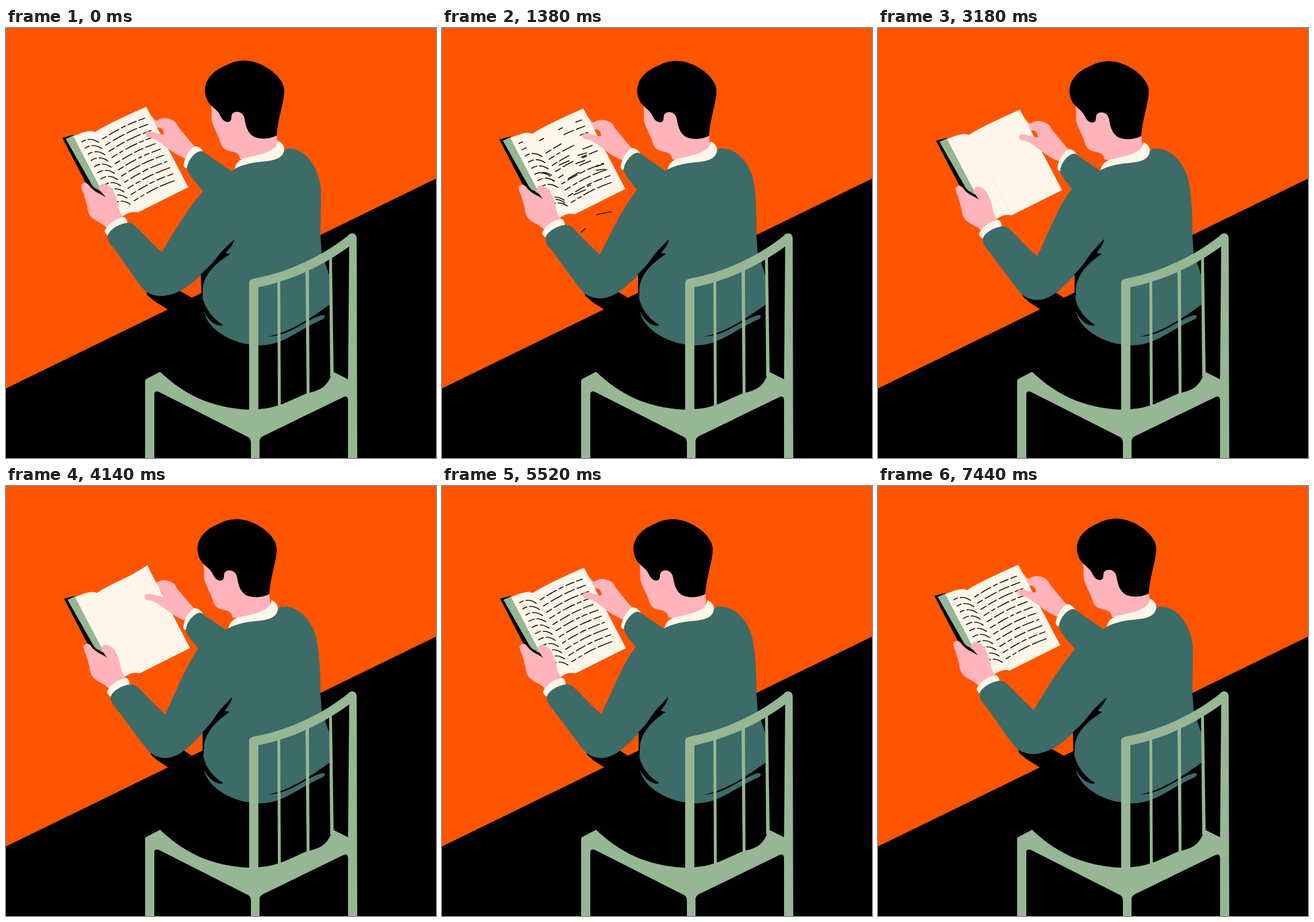
These frames come from a looping animation (748x748 px, 7500 ms). An HTML page:

```html
<!DOCTYPE html>
<html lang="en">
<head>
<meta charset="utf-8">
<title>Reader</title>
<style>
  html, body { margin: 0; width: 100%; height: 100%; overflow: hidden; background: #ff5500; }
  svg { display: block; width: 100vw; height: 100vh; }
  .ink path { fill: none; stroke: #14180f; stroke-width: 1.7; stroke-linecap: round; }
  .teal { fill: #3c6b68; }
  .skin { fill: #ffb3ba; }
  .cream { fill: #fff6ea; }
  .green { fill: #96b694; }
</style>
</head>
<body>
<svg viewBox="0 0 748 748">
  <defs>
    <clipPath id="flapClip"><path id="flapClipPath"/></clipPath>
    <path id="finger" class="skin" d="M248 150C254 150 258 163 263 161C270 155 286 154 297 166L292 190L275 185C274 176 270 171 262 174C256 166 250 155 248 150Z"/>
  </defs>
  <path fill="#ff5500" d="M0 0H748V748H0Z"/>
  <path d="M0 627L748 262V748H0Z"/>
  <path id="thigh"/>

  <g id="fingerBack"><use href="#finger"/></g>
  <g id="book">
    <path d="M98 191L117 186L175 290L172 296L138 268Z"/>
    <path class="green" d="M104 193L117 187L168 284L160 284L150 274Z"/>
    <path class="cream" d="M117 188C130 183 145 177 152 180L155 181C180 165 215 150 244 137L317 277L229 321C220 318 210 322 204 327L191 330Z"/>
    <path d="M189 245L229 321" stroke="#eaded0" stroke-width=".8"/>
    <path d="M144 274L160 281L174 294L165 293Z"/>
    <g id="leftInk" class="ink"></g>
    <g id="rightInk" class="ink"></g>
  </g>
  <g id="fingerFront"><use href="#finger"/></g>
  <g id="flapLayer">
    <path id="flap" class="cream"/>
    <g id="flapInk" class="ink" clip-path="url(#flapClip)"></g>
  </g>
  <g id="fallInk" class="ink"></g>

  <g id="nearHand">
    <path class="skin" d="M133 271C137 268 142 270 145 275C152 285 165 288 174 295C170 288 159 282 163 275C166 268 176 271 181 276C189 284 194 300 196 312C198 322 203 327 207 333L176 349C170 340 160 338 152 332C142 325 142 315 141 308C138 302 139 297 136 293C137 288 132 285 132 279C130 275 131 272 133 271Z"/>
    <path class="cream" d="M172 352C180 337 195 330 206 329C211 333 212 338 210 342L184 364L176 360C172 356 171 354 172 352Z"/>
  </g>
  <g id="farHand">
    <path class="skin" d="M276 164C285 157 296 163 299 171C308 182 318 195 330 208L312 227C300 222 288 215 280 208C270 202 262 192 250 191C241 190 240 181 247 180C256 179 266 186 275 185C275 176 272 171 270 168Z"/>
    <path class="cream" d="M309 239C310 226 318 212 328 206C334 205 340 210 343 215L319 243C314 245 309 243 309 239Z"/>
  </g>

  <path id="torso" class="teal"/>
  <path id="sleeve" class="teal" d="M341 214L392 249L425 280L370 320L343 284C330 268 314 252 315 243C316 230 330 213 341 214Z"/>
  <path id="fold"/>
  <g id="head">
    <path class="skin" d="M354 130C361 140 355 152 359 165C363 177 370 188 373 199C377 212 385 213 394 215C402 217 406 220 407 228L440 230L474 212L471 185L420 135Z"/>
    <path d="M346 108C347 85 365 72 385 64C395 58 410 56 420 57C450 60 483 85 484 108C484 130 473 155 471 187C460 193 445 194 433 190C420 184 417 170 415 158C413 147 402 143 395 148C390 152 394 158 390 162C385 166 377 162 373 153C370 145 362 140 356 134C350 128 346 118 346 108Z"/>
  </g>
  <path id="collar" class="cream" d="M398 245C400 235 405 230 415 226C435 222 455 218 466 209C472 204 472 200 473 196C482 200 486 208 483 216C478 230 460 231 440 233C425 235 410 238 398 245Z"/>

  <g class="green">
    <path fill-rule="evenodd" d="M423 443C423 438 429 436 435 435C490 425 550 397 594 362C600 354 610 357 610 366L611 748H595V648C595 641 591 640 587 642L447 710C442 713 441 716 441 720V748H426V722C426 716 424 713 420 711L266 633C261 631 258 633 258 637V748H242V614Q242 611 245 610L268 598C308 636 355 661 423 664ZM439 451C500 438 550 414 597 380L595 611L569 598L565 606C556 628 541 631 525 635C502 643 478 661 439 663Z"/>
    <path d="M472 438H477L478 660H473Z M521 420H527L528 640H523Z M562 400H567L570 606H564Z"/>
  </g>
</svg>
<script>
const LOOP = 7500, STEP = 60, ROWS = 11;
const $ = id => document.getElementById(id);
const clamp = x => Math.max(0, Math.min(1, x));
const ramp = (t, a, b) => clamp((t - a) / (b - a));
const ease = (t, a, b) => { const x = ramp(t, a, b); return x * x * (3 - 2 * x); };
const lerp = (a, b, k) => a + (b - a) * k;
const mix = (p, q, k) => [lerp(p[0], q[0], k), lerp(p[1], q[1], k)];
const pt = p => p.map(v => v.toFixed(2)).join(' ');
const move = (id, x, y, extra = '') => $(id).setAttribute('transform', `translate(${x} ${y})${extra}`);
const show = (id, on) => $(id).setAttribute('display', on ? 'inline' : 'none');

// Blends two path strings that share the same commands.
function blend(a, b, k) {
  const nums = b.match(/-?[\d.]+/g);
  let i = 0;
  return a.replace(/-?[\d.]+/g, n => lerp(+n, +nums[i++], k).toFixed(2));
}

const hem = 'C341 480 355 500 372 513C378 515 378 518 374 518C360 517 348 503 344 492C350 525 395 552 443 552C482 552 510 524 550 507C557 503 556 498 548 500C520 508 495 536 454 537C485 532 518 514 563 481L563 432L549 390L547 360';
const shapes = {
  torso: [
    'M392 249C375 255 352 270 343 284C317 312 288 362 271 390C255 376 235 354 222 342C213 334 190 343 180 355C174 363 177 372 185 380C205 405 222 435 240 455C248 464 262 467 275 466C300 463 320 448 339 430L372 405C350 422 341 440 341 458' + hem + 'C547 335 548 310 548 285C547 250 525 207 488 210L484 212L430 225Z',
    'M386 248C370 255 347 268 337 280C315 307 292 367 277 397C260 383 241 361 228 349C219 340 195 349 185 361C180 368 182 377 190 385C210 410 230 440 248 461C255 469 268 474 281 473C306 470 324 448 342 430L372 405C352 422 343 440 343 458' + hem + 'C547 330 546 298 541 270C536 240 512 206 478 210L474 213L420 226Z'],
  fold: [
    'M397 368C396 376 388 385 382 391L390 393L373 405C351 422 342 440 342 458L342 468L340 464L339 428C355 415 366 400 374 390C382 382 390 374 397 368Z',
    'M393 367C393 375 386 384 380 391L389 393L373 405C353 422 344 440 344 458L344 468L342 462L342 428C356 415 364 400 372 390C379 382 387 374 393 367Z'],
  thigh: [
    'M243 456L246 465L258 475L282 490L323 469L298 455Z',
    'M250 460L252 467L263 477L283 490L323 469L306 458Z']
};

let seed = 11;
const rand = () => (seed = (seed * 16807) % 2147483647) / 2147483647;

const rightPoint = (row, u) => [168 + 73 * u + 5.5 * row, 193 - 36 * u - 3 * Math.sin(Math.PI * u) + 10.75 * row];
const leftPoint = (row, u) => [132 + 29 * u + 5.5 * row, 198 - 18 * u + 19 * u * u + 10.75 * row];

function makeDash(place, row, from, to) {
  const a = place(row, from), m = place(row, (from + to) / 2), b = place(row, to);
  const ctrl = [0, 1].map(i => 2 * m[i] - (a[i] + b[i]) / 2);
  return {
    d: `M${pt(a)}Q${pt(ctrl)} ${pt(b)}`, mid: m, left: place === leftPoint,
    start: 860 + 45 * row + rand() * 1150, spin: (rand() - .5) * 400
  };
}

const dashes = [];
for (let row = 0; row < ROWS; row++) {
  const split = .22 + rand() * .1;
  dashes.push(makeDash(leftPoint, row, 0, split), makeDash(leftPoint, row, split + .16, 1));
  let u = 0;
  while (u < .95) {
    const len = u === 0 || rand() < .35 ? .07 + rand() * .06 : .18 + rand() * .16;
    const end = Math.min(1, u + len);
    dashes.push(makeDash(rightPoint, row, u, end));
    u = end + .065;
  }
}

function addDash(dash, groupId) {
  const path = document.createElementNS('http://www.w3.org/2000/svg', 'path');
  path.setAttribute('d', dash.d);
  $(groupId).append(path);
  return path;
}
for (const dash of dashes) {
  dash.falling = addDash(dash, 'fallInk');
  addDash(dash, dash.left ? 'leftInk' : 'rightInk');
  if (dash.left) addDash(dash, 'flapInk');
}

const spine = [[155, 181], [229, 321]];
const rightEdge = [[244, 137], [317, 277]];
const leftEdge = [[117, 188], [191, 328]];

function flapPath(q) {
  const turn = (i, x, lift) => {
    const flat = mix(rightEdge[i], leftEdge[i], (1 - Math.cos(Math.PI * x)) / 2);
    return { flat, tip: [flat[0], flat[1] - lift * Math.sin(Math.PI * x)] };
  };
  const top = turn(0, q, 27), low = turn(1, clamp(q - .07 * Math.sin(Math.PI * q)), 6);
  const curl = Math.sin(Math.PI * q);
  const side = mix(top.tip, low.tip, .12);
  const bend = [side[0] - 5 * curl, side[1] + 3 * curl];
  return `M${pt(spine[0])}Q${pt(mix(spine[0], top.flat, .75))} ${pt(top.tip)}` +
    `Q${pt(bend)} ${pt(mix(top.tip, low.tip, .25))}L${pt(low.tip)}L${pt(spine[1])}Z`;
}

// Ink slides along the slope of the page and is lost behind the arm.
function drop(dash, t) {
  const s = Math.max(0, t - dash.start) / 1000;
  const y = 700 * s * s;
  const [x0, y0] = dash.mid;
  dash.falling.setAttribute('transform', `translate(${.45 * y} ${y}) rotate(${dash.spin * s * s} ${x0} ${y0})`);
  dash.falling.setAttribute('display', y0 + y < 435 ? 'inline' : 'none');
}

function draw(t) {
  const body = ease(t, 600, 1960) - ease(t, 6000, 6940);
  const head = ease(t, 660, 2100) - ease(t, 6200, 6860);
  const reach = ease(t, 4000, 4700) - ease(t, 4800, 5560);
  const q = ramp(t, 4060, 5460);
  const turning = q > 0 && q < 1;

  for (const id in shapes) $(id).setAttribute('d', blend(...shapes[id], body));
  const bx = 3 * body, by = 5 * body;
  for (const id of ['book', 'flapLayer', 'fallInk']) move(id, bx, by);
  move('nearHand', 4 * body, by);
  const spin = ` rotate(${-8 * reach} 322 225)`;
  for (const id of ['farHand', 'fingerBack', 'fingerFront'])
    move(id, bx - 36 * reach, by + 17 * reach, spin);
  move('sleeve', 2 * body - 38 * reach, 4.5 * body + 19 * reach);
  move('head', -13 * head, head);
  move('collar', -11 * head, 2.5 * head);

  show('fingerBack', reach <= .03);
  show('fingerFront', reach > .03);
  show('flapLayer', turning);
  show('rightInk', q > 0);
  show('leftInk', q === 1);
  show('fallInk', t < 3600);
  if (turning) {
    const d = flapPath(q);
    $('flap').setAttribute('d', d);
    $('flapClipPath').setAttribute('d', d);
  }
  if (t < 3600) dashes.forEach(dash => drop(dash, t));
}

const origin = performance.now();
function tick(now) {
  const t = Math.max(0, now - origin) % LOOP;
  draw(Math.floor(t / STEP) * STEP);
  requestAnimationFrame(tick);
}
draw(0);
requestAnimationFrame(tick);
</script>
</body>
</html>
```
